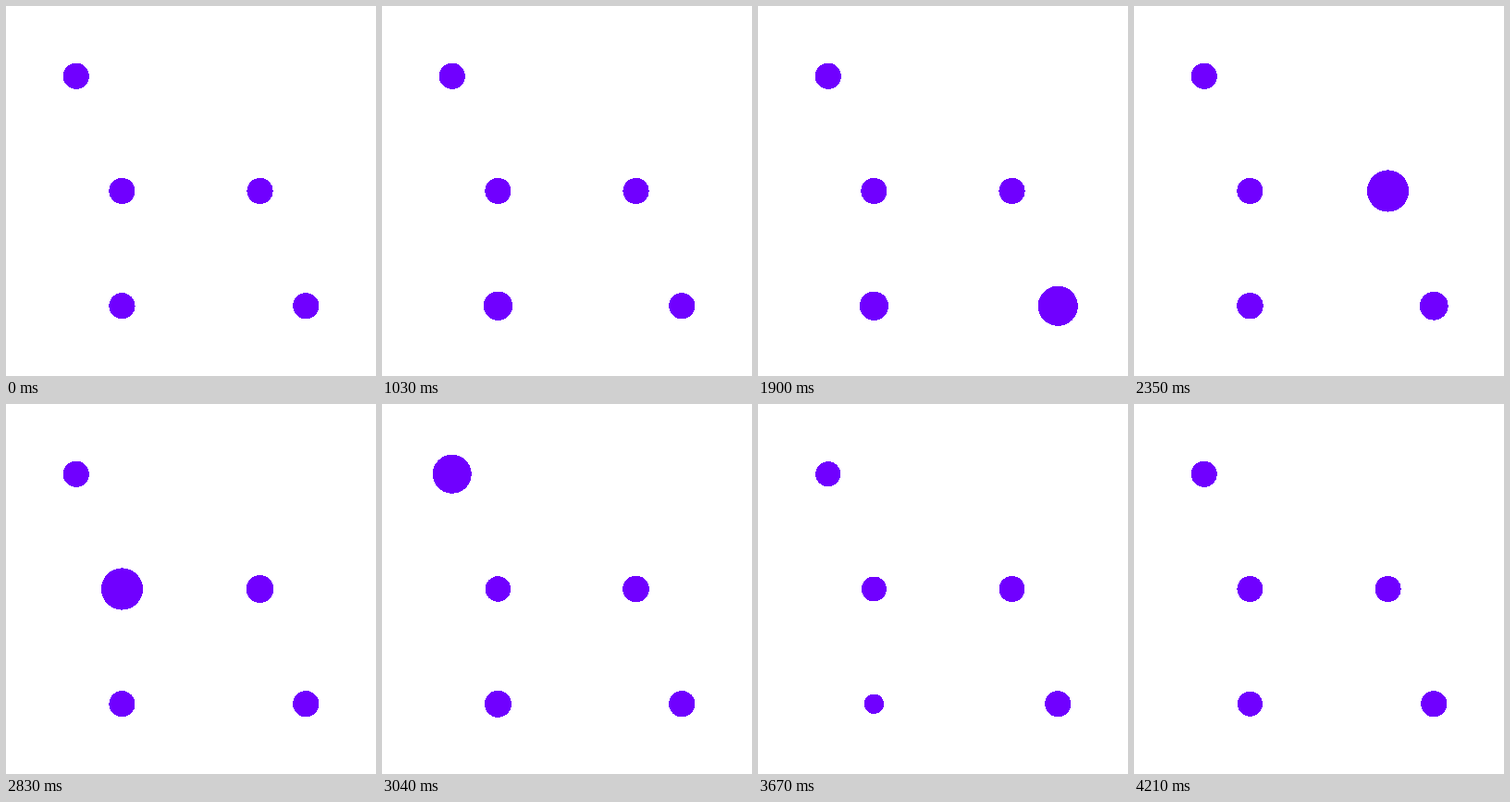
Write an HTML page that moves like this. It is 400 px wide and 400 px high and loops after 4.24 s.

```html
<!DOCTYPE html>
<html lang="en">
<head>
<meta charset="utf-8">
<title>Pulsing dots</title>
<style>
  html, body { margin: 0; width: 100%; height: 100%; overflow: hidden; background: #fff; }
  svg { display: block; width: 100%; height: 100%; }
  circle { fill: #7000ff; shape-rendering: crispEdges; }
</style>
</head>
<body>
<svg id="stage" viewBox="0 0 400 400"></svg>
<script>
const LOOP = 4240, STILL = 1030, STEP = 30;
const RADIUS = 14.1, SWELL = 8.5, GRID = 49.7;
const RISE = 200, RELEASE = 338;
const PERIOD = 537, DAMPING = 0.0032;

// Grid position from the centre and the times at which each dot is struck.
const dots = [
  { col: -2.5, row: -2.5, hits: [2926] },
  { col: -1.5, row: 0, hits: [2540] },
  { col: 1.5, row: 0, hits: [2030] },
  { col: -1.5, row: 2.5, hits: [1010, 3035] },
  { col: 2.5, row: 2.5, hits: [1520] }
];

const stage = document.getElementById('stage');
for (const dot of dots) {
  dot.el = document.createElementNS('http://www.w3.org/2000/svg', 'circle');
  dot.el.setAttribute('cx', 200 + dot.col * GRID);
  dot.el.setAttribute('cy', 200 + dot.row * GRID);
  stage.appendChild(dot.el);
}

// Quick swell, short hold, then a damped spring back to rest.
function pulse(t) {
  if (t <= 0) return 0;
  if (t < RISE) return 1 - (1 - t / RISE) ** 2;
  if (t < RELEASE) return 1;
  const s = t - RELEASE, w = 2 * Math.PI / PERIOD;
  return Math.exp(-DAMPING * s) * (Math.cos(w * s) + DAMPING / w * Math.sin(w * s));
}

function render(ms) {
  const t = ms % LOOP;
  const time = t < STILL ? 0 : STILL + Math.floor((t - STILL) / STEP) * STEP;
  for (const { el, hits } of dots) {
    const swell = hits.reduce((sum, hit) => sum + pulse(time - hit), 0);
    el.setAttribute('r', (RADIUS + SWELL * swell).toFixed(2));
  }
}

const start = performance.now();
function tick() {
  render(performance.now() - start);
  requestAnimationFrame(tick);
}
tick();
</script>
</body>
</html>
```
